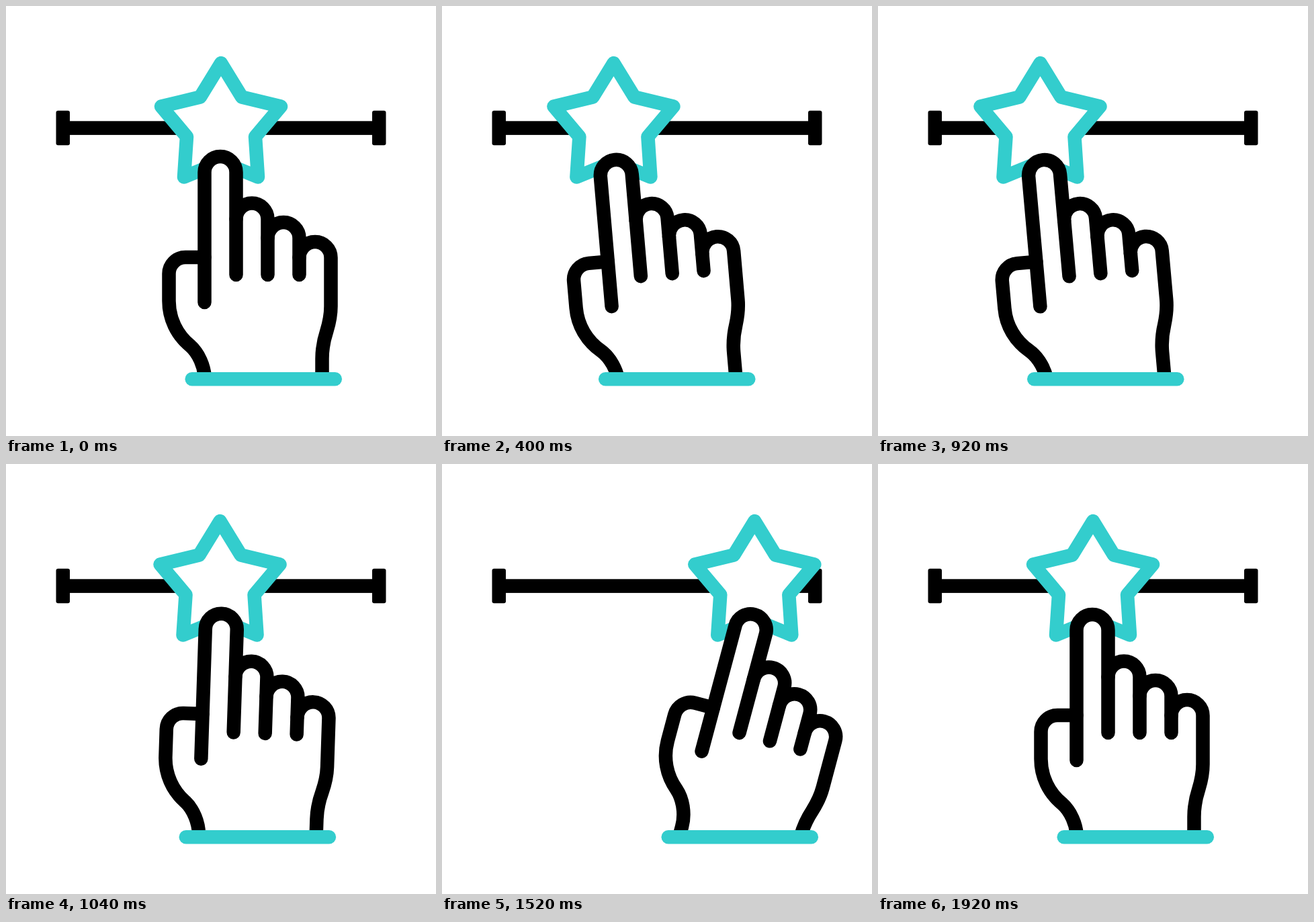
An HTML page that plays this animation: 640x640 px, repeating every 2 s.

```html
<!DOCTYPE html>
<html lang="en">
<head>
<meta charset="utf-8">
<title>Star slider</title>
<style>
  html, body { margin: 0; width: 100%; height: 100%; overflow: hidden; background: #fff; }
  svg { display: block; width: 100vw; height: 100vh; }
  .ink, .teal {
    fill: none; stroke: #000; stroke-width: 20.5;
    stroke-linecap: round; stroke-linejoin: round;
  }
  .teal { stroke: #33cdcd; }
  .solid { fill: #fff; }
</style>
</head>
<body>
<svg viewBox="0 0 640 640">
  <clipPath id="wrist"><rect width="640" height="551"/></clipPath>

  <rect x="85" y="171.3" width="470" height="20.6"/>
  <rect x="74.5" y="155.7" width="20.5" height="51.6" rx="3"/>
  <rect x="545" y="155.7" width="20.5" height="51.6" rx="3"/>

  <path id="star" class="teal solid" d="M320 85L351 135.5L409 149.5L371 194.5L375 254.5L320 232L265 254.5L269 194.5L231 149.5L289 135.5Z"/>

  <g clip-path="url(#wrist)">
    <g id="hand">
      <path class="ink solid" d="M296 590V557C296 536 286 516 274 505.5
        C254 489 242.5 465 242.5 439V398.5A24.5 24.5 0 0 1 267 374H295.5
        V247.5A23.5 23.5 0 0 1 342.5 247.5V317
        A23.5 23.5 0 0 1 389.5 317V345.5
        A23.5 23.5 0 0 1 436.5 345.5V374.5
        A23.5 23.5 0 0 1 483.5 374.5V447
        C483.5 460 481 472 477.3 484C473 497 470.5 510 470.5 525V590"/>
      <path class="ink" d="M295.5 374V441M342.5 317V400M389.5 345V400M436.5 374V400"/>
    </g>
  </g>

  <path id="cuff" class="teal" d="M276.7 555.2H489.8"/>
</svg>
<script>
  const LOOP = 2000, STEP = 40;
  const PIVOT = [361.8, 552.4];

  // time, star shift, hand shift, hand angle
  const poses = [
    [120, 0, 0, 0],
    [720, -143.5, -74.5, -11],
    [1400, 168, 69.4, 17.3],
    [1920, 0, 0, 0]
  ];

  const [star, hand, cuff] = ["star", "hand", "cuff"].map(id => document.getElementById(id));
  const ease = p => p * p * (3 - 2 * p);

  function poseAt(t) {
    const next = poses.findIndex(pose => t < pose[0]);
    if (next < 1) return [0, 0, 0];
    const a = poses[next - 1], b = poses[next];
    const k = ease((t - a[0]) / (b[0] - a[0]));
    return [1, 2, 3].map(i => a[i] + (b[i] - a[i]) * k);
  }

  function draw(now) {
    // the motion advances in 25 steps per second
    const t = Math.floor((now % LOOP) / STEP + 0.01) * STEP;
    const [starX, handX, angle] = poseAt(t);
    star.setAttribute("transform", `translate(${starX} 0)`);
    hand.setAttribute("transform", `translate(${handX} 0) rotate(${angle} ${PIVOT})`);
    cuff.setAttribute("transform", `translate(${handX} 0)`);
    requestAnimationFrame(draw);
  }
  draw(0);
</script>
</body>
</html>
```
